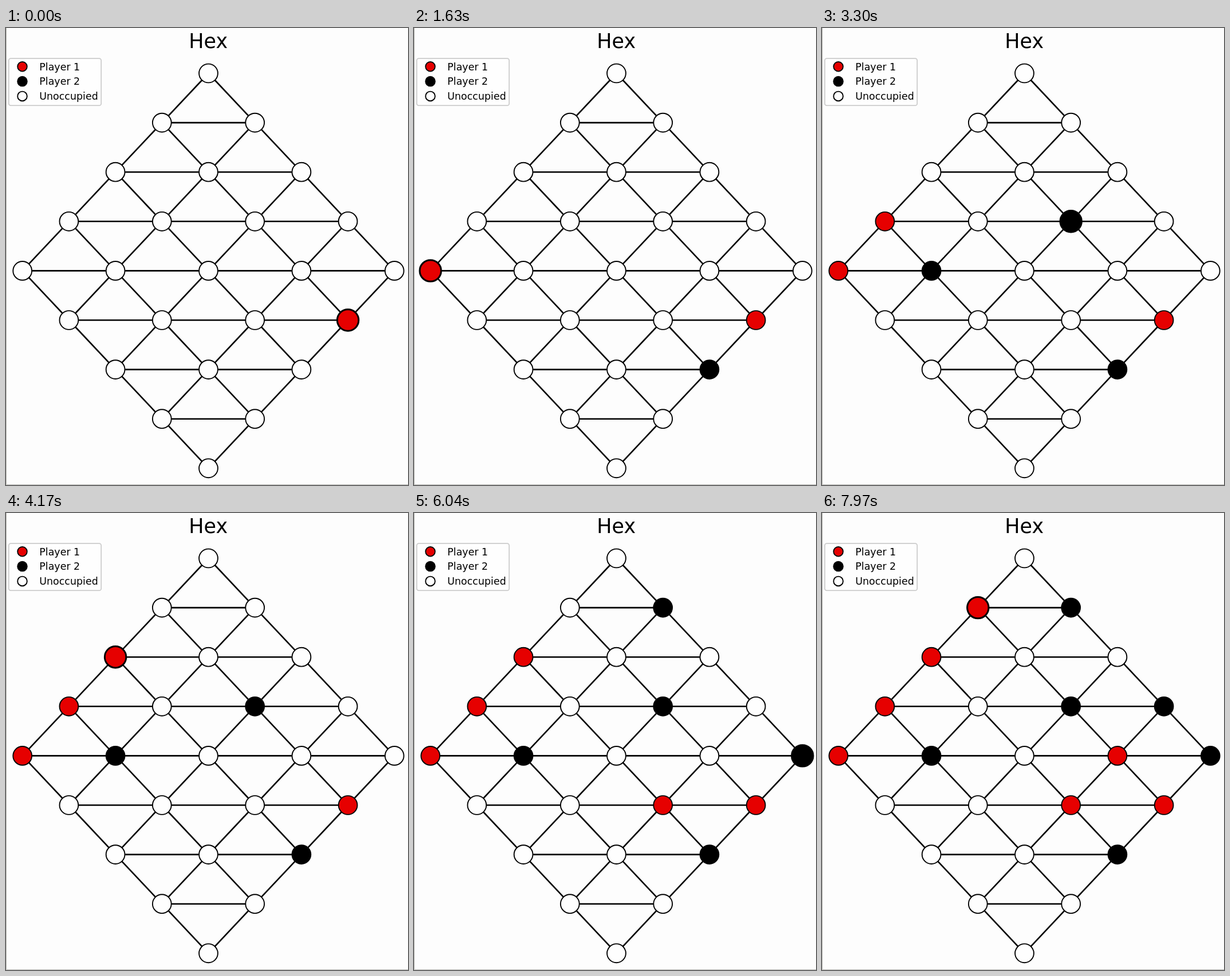
Animation, 702 px wide and 797 px high, one loop 8 s. Source, as an HTML page:

```html
<!DOCTYPE html>
<html lang="en">
<head>
<meta charset="utf-8">
<title>Hex</title>
<style>
  html, body { margin: 0; width: 100%; height: 100%; overflow: hidden; background: #fdfdfd; }
  svg { display: block; width: 702px; height: 797px; }
  text { font-family: "DejaVu Sans", sans-serif; font-size: 17.45px; }
  .title { font-size: 34.9px; text-anchor: middle; }
  .edges { stroke: #000; stroke-width: 2.6; }
  circle { fill: #fefefe; stroke: #000; stroke-width: 1.9; }
  circle.p1 { fill: #e60000; }
  circle.p2 { fill: #000; }
  circle.last { stroke-width: 3; }
</style>
</head>
<body>
<svg viewBox="0 0 702 797">
  <path d="M.5 0V796.5H702" fill="none" stroke="#b4b4b0"/>
  <text class="title" x="353.2" y="35">Hex</text>
  <rect x="4.8" y="53.2" width="161.4" height="82" rx="3.5" fill="#fefefe" stroke="#ccc" stroke-width="1.8"/>
  <g id="legend"></g>
  <g id="edges" class="edges"></g>
  <g id="nodes"></g>
</svg>
<script>
const SIZE = 5, LOOP = 8000, TURN = 1900 / 3, LEAD = 100 / 3;
// Row and column of each stone, players alternating.
const MOVES = '14 24 40 31 30 12 20 01 23 04 13 03 10'.split(' ');

const byId = id => document.getElementById(id);
const posX = (r, c) => 353.5 + 81.2 * (c - r);
const posY = (r, c) => 79 + 86.1 * (r + c);

function add(parent, tag, attrs) {
  const el = document.createElementNS('http://www.w3.org/2000/svg', tag);
  for (const key in attrs) el.setAttribute(key, attrs[key]);
  return parent.appendChild(el);
}

['Player 1', 'Player 2', 'Unoccupied'].forEach((label, i) => {
  const y = 67.3 + 25.8 * i;
  add(byId('legend'), 'circle', { cx: 28.5, cy: y, r: 8.3, class: 'p' + (i + 1) });
  add(byId('legend'), 'text', { x: 58.3, y: y + 6.2 }).textContent = label;
});

const nodes = {};
for (let r = 0; r < SIZE; r++) {
  for (let c = 0; c < SIZE; c++) {
    for (const [dr, dc] of [[0, 1], [1, 0], [1, -1]]) {
      const r2 = r + dr, c2 = c + dc;
      if (r2 >= SIZE || c2 >= SIZE || c2 < 0) continue;
      add(byId('edges'), 'line', {
        x1: posX(r, c), y1: posY(r, c), x2: posX(r2, c2), y2: posY(r2, c2)
      });
    }
    nodes[`${r}${c}`] = add(byId('nodes'), 'circle', { cx: posX(r, c), cy: posY(r, c), r: 16.4 });
  }
}

let shown = -1;
function draw(now) {
  const last = Math.floor((now % LOOP + LEAD) / TURN);
  if (last !== shown) {
    shown = last;
    MOVES.forEach((id, i) => {
      const player = i > last ? '' : i % 2 ? 'p2' : 'p1';
      nodes[id].setAttribute('class', player + (i === last ? ' last' : ''));
      nodes[id].setAttribute('r', i === last ? 18.7 : 16.4);
    });
  }
}

const start = performance.now();
function tick() {
  draw(performance.now() - start);
  requestAnimationFrame(tick);
}
tick();
</script>
</body>
</html>
```
